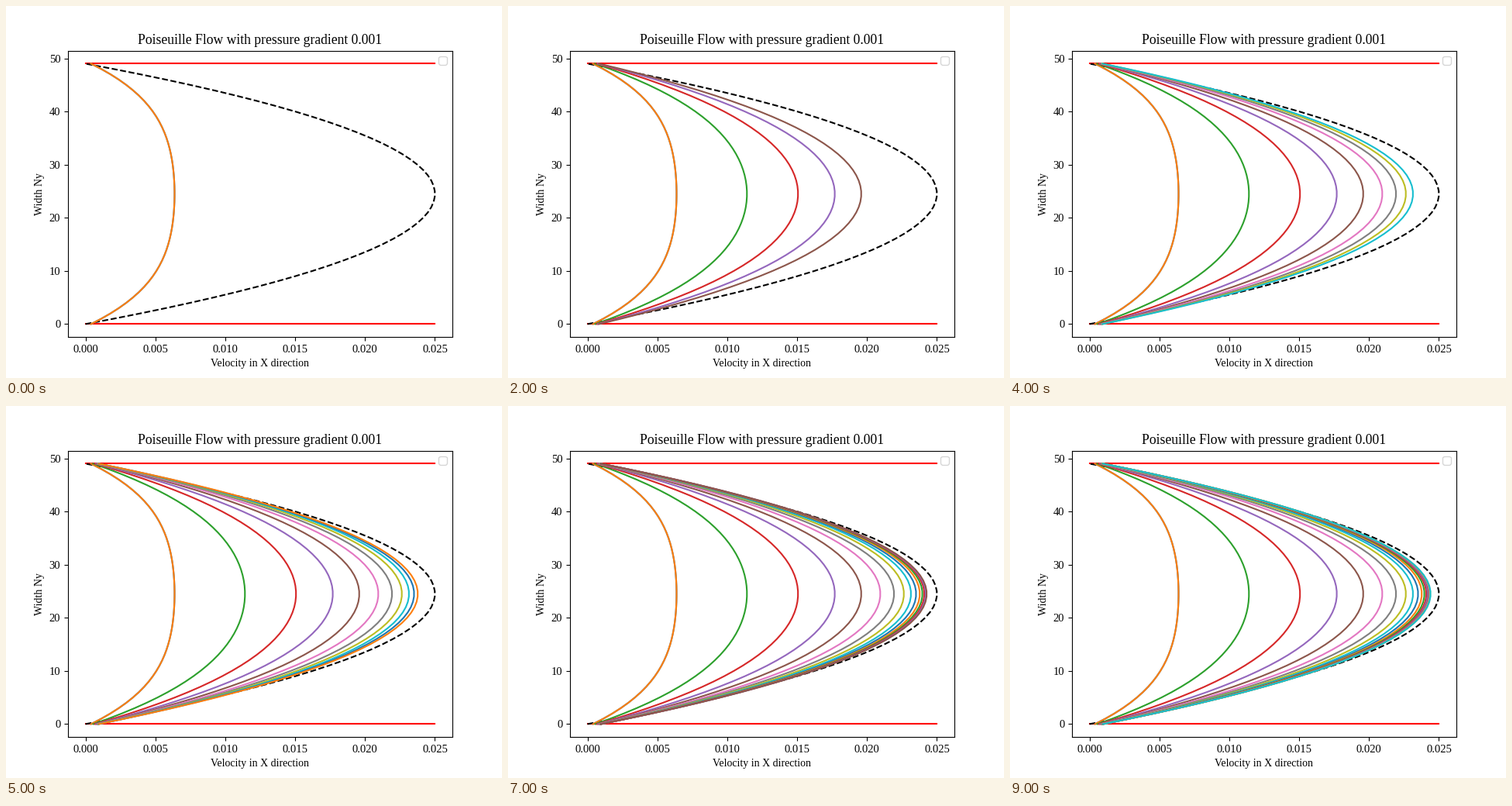
These frames come from a looping animation (640 px wide and 480 px high, 9.5 s). A matplotlib script:

```python
import numpy as np
import matplotlib.pyplot as plt
from matplotlib.animation import FuncAnimation

plt.rcParams["font.family"] = "Liberation Serif"

FRAMES, INTERVAL = 19, 500
STEPS = 500          # solver steps between two plotted profiles
NY = 50              # lattice nodes across the channel
NU = 1 / 6           # lattice viscosity
U_EXACT = 0.025      # peak of the analytical profile
U_STEADY = 0.02445   # peak the solver converges to

y = np.arange(NY)


def profile(t):
    """Start-up Poiseuille flow, walls half a cell outside the end nodes."""
    s = (y + 0.5) / NY
    u = 4 * s * (1 - s)
    for n in range(1, 20, 2):
        decay = np.exp(-NU * (n * np.pi / NY) ** 2 * t)
        u -= 32 / (n * np.pi) ** 3 * np.sin(n * np.pi * s) * decay
    return U_STEADY * u


fig, ax = plt.subplots(figsize=(6.4, 4.8), dpi=100)

for wall in (0, NY - 1):
    ax.plot([0, U_EXACT], [wall, wall], color="red")
ax.plot(4 * U_EXACT * y * (NY - 1 - y) / (NY - 1) ** 2, y, "k--")

# The first profile is drawn twice, in C0 and then C1.
ax.plot(profile(STEPS + 3), y, color="C0")
curves = [
    ax.plot(profile(STEPS * (k + 1) + 3), y, color=f"C{(k + 1) % 10}")[0]
    for k in range(FRAMES)
]

ax.set_title("Poiseuille Flow with pressure gradient 0.001", fontsize=12.7)
ax.set_xlabel("Velocity in X direction", fontsize=10)
ax.set_ylabel("Width Ny", fontsize=10)
ax.tick_params(labelsize=10.5)
ax.legend([], [], loc="upper right")


def update(i):
    for k, curve in enumerate(curves):
        curve.set_visible(k <= i)
    return curves


anim = FuncAnimation(fig, update, frames=FRAMES, interval=INTERVAL,
                     init_func=lambda: update(0), repeat=True)
plt.show()
```
